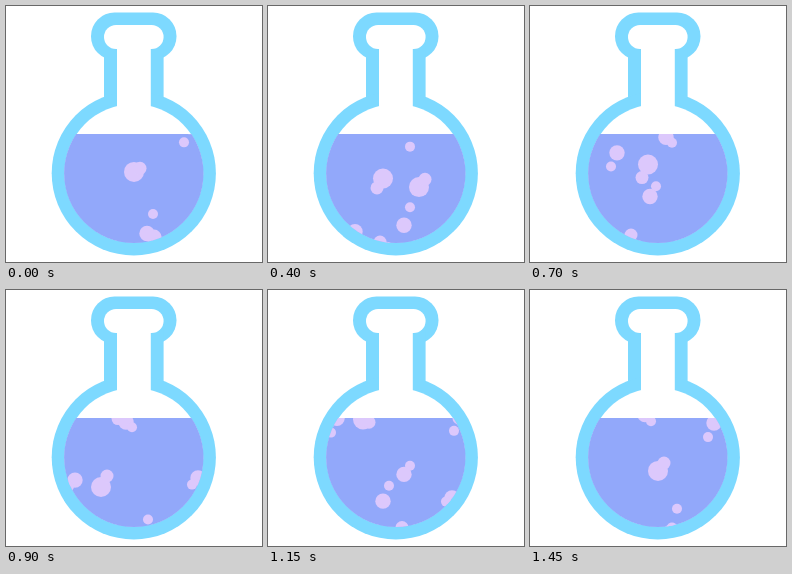
Write an HTML page that moves like this. It is 256 px wide and 256 px high and loops after 1500 ms.

```html
<!DOCTYPE html>
<html lang="en">
<head>
<meta charset="utf-8">
<title>Bubbling flask</title>
<style>
  html, body { margin: 0; height: 100%; overflow: hidden; background: #fff; }
  svg { display: block; width: 100vw; height: 100vh; }
</style>
</head>
<body>
<svg viewBox="0 0 256 256">
  <clipPath id="inside"><circle cx="127.8" cy="167.3" r="69.7"/></clipPath>
  <clipPath id="belowSurface"><path d="M0 128H256V256H0Z"/></clipPath>
  <g fill="#7dd9ff">
    <rect x="85" y="6.5" width="85.5" height="47.5" rx="23.5"/>
    <path d="M98 40H157.6V105H98Z"/>
    <circle cx="127.8" cy="167.3" r="82.1"/>
  </g>
  <g fill="#fff">
    <rect x="98" y="19" width="59.6" height="24" rx="12"/>
    <path d="M111 30H144.8V110H111Z"/>
    <circle cx="127.8" cy="167.3" r="69.4"/>
  </g>
  <g clip-path="url(#inside)">
    <g id="liquid" clip-path="url(#belowSurface)">
      <path fill="#92a8fa" d="M0 128H256V256H0Z"/>
    </g>
  </g>
</svg>
<script>
const LOOP = 1500, STEP = 50, MIDDLE = 180, CENTER = 128, BIG_COUNT = 5;

// x and time (ms) at which each leading bubble passes mid-height, big ones first
const leaders = [
  [151, 404], [118, 626], [95, 963], [115, 374], [128, 1453],
  [148, 182], [141, 165], [69, 941], [115, 1258], [184, 1262],
  [120, 736], [192, 933], [136, 1165], [87, 574], [136, 534]
];
const liquid = document.getElementById("liquid");
const bubbles = [];

function addBubble(x, radius, passTime, speed) {
  const dot = document.createElementNS("http://www.w3.org/2000/svg", "circle");
  dot.setAttribute("cx", x);
  dot.setAttribute("r", radius);
  dot.setAttribute("fill", "#dcc8fc");
  liquid.append(dot);
  bubbles.push({ dot, passTime, speed });
}

// Leaders rise faster near the middle; each has a smaller, slower companion
// on alternating sides
leaders.forEach(([x, passTime], i) => {
  const radius = i < BIG_COUNT ? 10 : 7.7;
  const side = i % 2 ? -1 : 1;
  addBubble(x, radius, passTime, 300 - 0.9 * Math.abs(x - CENTER));
  addBubble(x + 6 * side, radius * 0.65, passTime - 35 * side, 215);
});

const start = performance.now();

function draw() {
  const elapsed = performance.now() - start;
  const time = Math.floor(elapsed / STEP) * STEP % LOOP;
  for (const { dot, passTime, speed } of bubbles) {
    // Time left until mid-height, wrapped to half a loop either way
    const remaining = (passTime - time + LOOP * 1.5) % LOOP - LOOP / 2;
    dot.setAttribute("cy", MIDDLE + remaining * speed / 1000);
  }
  requestAnimationFrame(draw);
}
draw();
</script>
</body>
</html>
```
